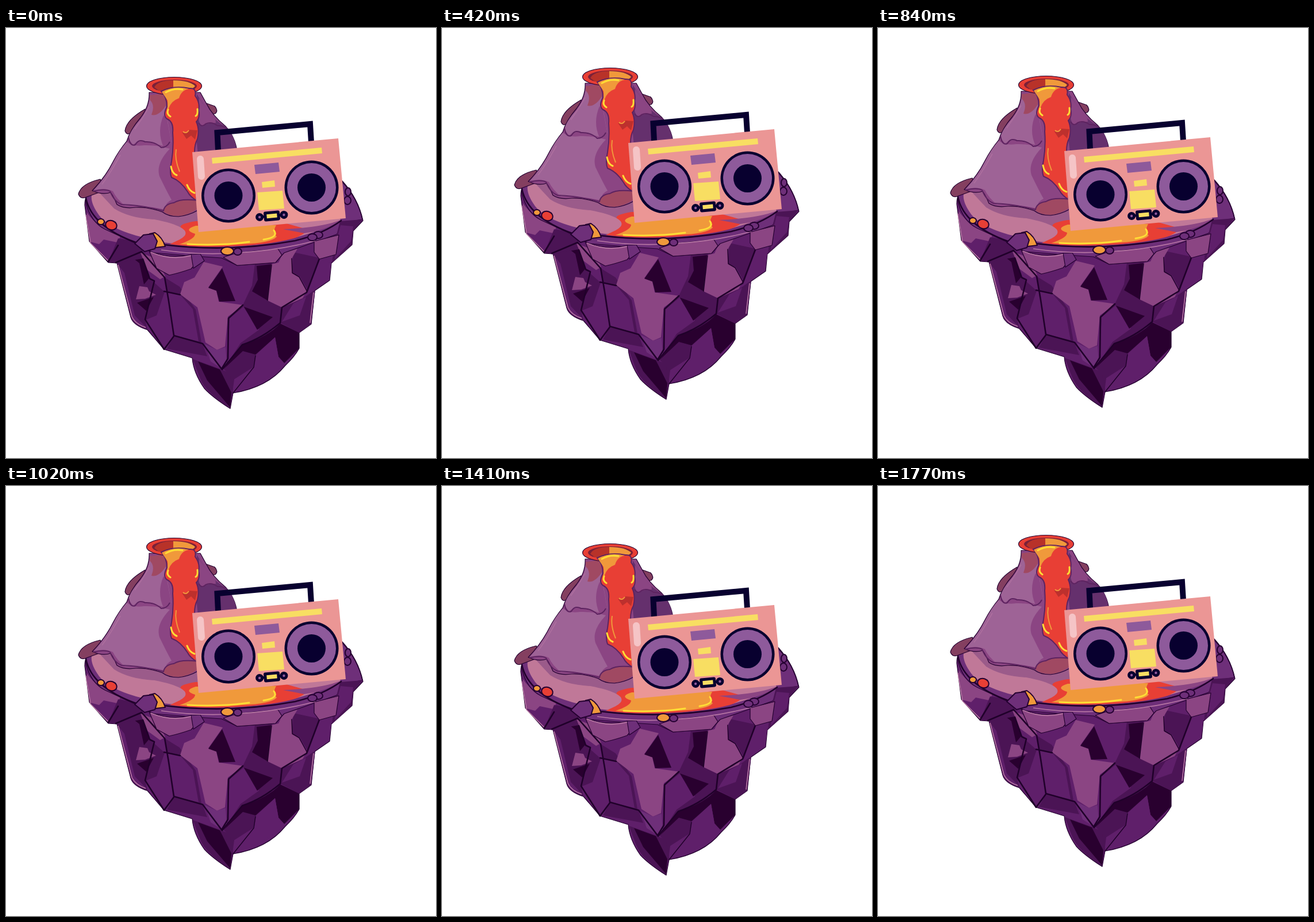
These frames come from a looping animation (748x748 px, 1800 ms). An HTML page:

```html
<!DOCTYPE html>
<html lang="en">
<head>
<meta charset="utf-8">
<title>Floating volcano</title>
<style>
html, body { margin: 0; width: 100%; height: 100%; overflow: hidden; background: #fff; }
svg { display: block; width: 100vw; height: 100vh; }
.deep { fill: #29002f; }
.dark { fill: #4b1455; }
.mid { fill: #5f1f6a; }
.plum { fill: #6e2f79; }
.mauve { fill: #8b4583; }
.cone { fill: #9e6396; }
.rose { fill: #c07898; }
.rust { fill: #a04962; }
.clay { fill: #843f60; }
.red { fill: #e83f35; }
.orange { fill: #f0993b; }
.yellow { fill: #f8de62; }
.navy { fill: #08002f; }
.violet { fill: #8e5a9b; }
.thin { stroke: #240030; stroke-width: 1.2; stroke-linejoin: round; }
.ink { stroke: #240030; stroke-width: 2; stroke-linejoin: round; }
.line { fill: none; stroke: #20002a; stroke-width: 2.6; stroke-linejoin: round; stroke-linecap: round; }
.seam { fill: none; stroke: #5d2360; stroke-width: 2; stroke-linejoin: round; }
.glow { fill: none; stroke: #fede35; stroke-width: 3; stroke-linecap: round; }
.edge { fill: none; stroke: #b877a4; stroke-width: 1.6; stroke-linejoin: round; }
</style>
</head>
<body>
<svg viewBox="0 0 748 748">
<g id="island">

  <g id="rock">
    <path class="mid thin" d="M150 283Q137 288 137 308L145 371L178 408L193 409L217 503Q221 517 246 525L275 559L324 574Q326 600 345 627Q360 643 390 662L395 635Q455 625 485 588Q503 571 510 557V530L531 515L537 457L563 439L566 409L602 377L604 353L621 335Q613 297 585 266L400 250Z"/>
    <path class="dark" d="M193 409L236 389L250 436L276 459L262 500L242 508L246 524Q222 518 217 503Z"/>
    <path class="mid" d="M206 426L224 500L245 522Q222 516 218 503L195 412Z"/>
    <path class="deep" d="M205 388L236 391L250 434L240 446L232 409Z"/>
    <path class="mauve" d="M140 320L147 372L162 376L170 368L194 373L200 360Q160 350 140 320Z"/>
    <path class="dark" d="M195 366L236 372L238 401L191 409L178 407Z"/>
    <path class="mauve" d="M234 391L263 402L277 432L268 437L246 421Z"/>
    <path class="mauve" d="M232 449L246 451L249 458L261 464L242 471L226 472Z"/>
    <path class="deep" d="M228 478L257 468L244 492Z"/>
    <path class="dark" d="M276 434L302 450L330 490L340 547L294 535L282 462Z"/>
    <path class="mid" d="M277 457L303 464L325 489L335 545L294 536Z"/>
    <path class="dark" d="M292 536L342 550L350 571L280 558Z"/>
    <path class="dark" d="M401 410L463 408L455 474L480 486L477 513Q445 540 411 550L384 582L388 505L412 483Z"/>
    <path class="mid" d="M400 411L433 410L428 448L412 482L398 478L377 418Z"/>
    <path class="deep" d="M436 414L461 411L455 474L428 458L438 438Z"/>
    <path class="mid" d="M389 505L413 485L440 525L408 548L385 584Z"/>
    <path class="deep" d="M414 485L464 503L437 525Z"/>
    <path class="mauve" d="M344 407L377 415L352 451L366 457L370 476L413 482L386 502L381 554L367 560L347 547L333 486L303 463L310 442L328 434Z"/>
    <path class="deep" d="M376 418L399 475L371 476L366 457L352 452Z"/>
    <path class="plum" d="M346 550L367 560L382 555L384 583L376 593L356 580Z"/>
    <path class="dark" d="M480 486L517 470L538 455L531 515L510 530L477 513Z"/>
    <path class="mid" d="M500 479L522 468L511 500L480 511Z"/>
    <path class="dark" d="M500 390L546 400L524 455L511 432L497 427Z"/>
    <path class="mid" d="M545 401L566 409L562 439L528 455Z"/>
    <path class="mauve" d="M462 411L474 408L482 391L507 384L497 401L498 426L509 433L523 457L516 470L480 486L455 474Z"/>
    <path class="dark" d="M325 576L375 594L393 602L395 635L390 661Q348 635 338 610Z"/>
    <path class="deep" d="M334 580L372 594L392 634L390 660L350 613Z"/>
    <path class="dark" d="M378 593L411 551L470 523L467 539L434 570L430 590L397 611L394 634L390 604Z"/>
    <path class="deep" d="M411 551Q455 538 477 514L510 530V557L484 583L474 572L468 538L434 568L412 562L379 593Z"/>
    <path class="mid" d="M468 538L474 572L484 583Q454 615 397 633L431 590L434 569Z"/>
    <path class="line" d="M191 408L236 389L276 434L283 475L292 535L342 549L375 593L386 575L387 505L412 482M238 402L250 436L258 440L242 507L275 559L292 536M275 458L303 464"/>
    <path class="line" d="M546 399L523 460L480 486L477 513Q445 540 411 551L376 594"/>
    <path class="line" style="stroke-width:1.5" d="M434 570L431 590L395 635M455 474L462 412M497 401L498 426L510 433L523 457"/>
    <path class="edge" d="M139 325L147 374L179 406M195 412L219 502Q225 515 243 521M535 460L529 513"/>
  </g>

  <g id="plateau">
    <path class="plum thin" d="M151 281Q137 288 139 304Q148 338 172 350L226 375L256 391L330 397L375 400L402 413L468 408L484 391L538 372L575 359L590 338L620 333Q612 297 585 268Z"/>
    <path class="dark" d="M581 336L620 333L604 353L602 377L567 409L571 376Z"/>
    <path class="mid" d="M582 343L604 345L600 371L572 402L577 362Z"/>
    <path class="rose" d="M151 284Q143 300 162 326Q178 347 226 361L274 373Q350 383 420 378Q520 369 582 334L560 290L340 270Z"/>
    <path fill="#9b5b8a" d="M160 284L188 314Q215 331 258 333Q290 339 304 347L334 340V285Z"/>
    <path class="mauve thin" d="M249 388Q285 403 322 394L336 403L322 419Q302 426 284 430L262 418Z"/>
    <path class="plum thin" d="M322 394L338 393L345 405L326 418Z"/>
    <path class="edge" d="M252 390Q286 405 322 396"/>
    <path class="mauve thin" d="M402 391L473 384L480 395L469 408L402 413L378 399Z"/>
    <path class="mauve thin" d="M536 371L579 360L574 394L545 402L536 390Z"/>
    <path class="line" d="M139 296Q149 345 226 373M275 377Q390 391 503 370Q552 358 583 335M178 406L195 378"/>
    <path class="edge" d="M270 386Q340 396 402 391Q475 387 538 370"/>
    <path class="orange ink" d="M250 358L259 356Q272 364 277 380L260 382Z"/>
    <path class="plum ink" d="M224 375L239 360L256 358L263 371L259 384L241 389Z"/>
    <path class="red" d="M330 336Q300 341 304 347Q322 357 302 368L285 376Q330 382 382 380Q455 378 500 366Q527 357 520 349L470 335Z"/>
    <path class="orange" d="M330 344Q307 351 329 358Q329 367 302 376Q360 381 410 376Q462 374 471 363Q463 355 470 343Z"/>
    <path class="glow" d="M316 376Q375 379 423 372M448 368Q475 364 466 352"/>
    <path class="mauve" d="M482 350Q550 347 582 334Q558 352 519 357Z"/>
    <g class="ink">
      <ellipse class="orange" cx="165" cy="337" rx="6" ry="5"/>
      <ellipse class="red" cx="183" cy="343" rx="10" ry="8" transform="rotate(20 183 343)"/>
      <ellipse class="plum" cx="403" cy="389" rx="7" ry="6"/>
      <ellipse class="orange" cx="385" cy="388" rx="11" ry="7"/>
      <ellipse class="plum" cx="543" cy="360" rx="8" ry="6"/>
      <ellipse class="plum" cx="533" cy="364" rx="8" ry="6"/>
      <ellipse class="plum" cx="595" cy="285" rx="5" ry="7"/>
      <ellipse class="plum" cx="594" cy="300" rx="6" ry="7"/>
    </g>
  </g>

  <g id="volcano">
    <path class="clay thin" d="M164 263Q130 271 126 289Q130 299 140 294L173 282Z"/>
    <path class="clay thin" d="M242 141Q209 160 207 179Q210 187 216 183L244 166Z"/>
    <path class="clay thin" d="M346 130L363 136Q370 144 364 149L352 151Z"/>
    <path class="mauve thin" d="M249 112Q250 135 234 156Q216 177 210 197Q196 214 186 233Q173 259 150 283Q168 291 182 286Q187 293 193 307Q205 315 226 312Q248 311 272 320Q282 328 300 328Q318 326 334 317V230L402 215Q399 190 382 171Q358 151 349 132L338 112Z"/>
    <path class="cone" d="M210 198Q222 207 240 204Q260 203 285 210Q260 236 267 258Q280 285 288 299Q276 304 278 316Q240 308 207 309Q192 297 186 284Q173 277 153 282Q175 258 187 233Q196 214 210 198Z"/>
    <path class="rust" d="M272 318Q276 307 292 304Q304 296 334 300V314Q317 326 300 327Q282 327 272 318Z"/>
    <path class="seam" d="M152 284Q172 279 181 284Q188 302 201 307Q236 308 274 318Q276 306 292 304Q304 296 334 300"/>
    <path class="cone" d="M250 119Q250 139 234 159Q215 179 213 193L221 203Q231 194 247 198L273 205L288 199L280 155L276 120Z"/>
    <path class="mauve" d="M274 152L280 158L288 200L274 207Q262 180 274 152Z"/>
    <path class="rust" d="M250 117L277 114L278 135Q266 154 253 151Q260 134 250 125Z"/>
    <path class="seam" d="M213 190Q216 207 225 203Q231 192 242 198Q258 197 270 208Q280 208 285 198"/>
    <path class="edge" d="M249 137Q237 158 224 176M199 221Q180 255 167 272" opacity=".6"/>
    <path fill="#65306d" d="M332 115Q343 132 352 147Q362 160 384 173Q399 190 401 211L334 222L329 166Z"/>
    <path class="mauve" d="M336 122L355 150Q366 158 365 165Q349 165 342 171Q333 166 335 145Z"/>
    <path class="seam" d="M335 165Q341 174 347 167Q357 162 368 170Q381 169 388 179"/>
    <ellipse class="red thin" cx="292.5" cy="101" rx="48" ry="15.5"/>
    <ellipse cx="293" cy="101" rx="39" ry="11" fill="#7b2038"/>
    <path fill="#b83229" d="M258 103Q264 91 291 91V109L266 109Z"/>
    <path class="orange" d="M291 91Q319 91 329 101Q323 110 291 110Z"/>
    <path class="seam" style="fill:#e83f35" d="M270 110Q292 99 319 105Q332 104 329 118Q338 130 335 143Q338 156 331 163Q337 176 333 193Q324 210 331 239V300Q320 293 316 285Q304 266 288 260Q284 251 288 232Q292 208 290 182Q292 163 280 158Q272 152 280 137Q280 120 270 110Z"/>
    <path class="orange" d="M271 111Q294 99 318 106Q305 108 301 122Q287 127 283 140L279 150Q282 135 281 126Z"/>
    <path class="glow" d="M278 112Q291 104 307 107M282 142Q279 150 286 154M333 141Q334 151 330 153M287 241Q289 253 297 256M315 273Q319 284 328 287"/>
    <path fill="#bd302d" d="M306 181Q313 185 319 177L333 178L329 194L322 187L314 193Z"/>
    <path fill="none" stroke="#f0993b" stroke-width="2" d="M308 180Q313 185 318 178M296 211Q293 228 302 250"/>
  </g>

  <g id="radio">
    <path fill="none" stroke="#08002f" stroke-width="10" d="M369 213L367.5 182L529 167L531 199"/>
    <path fill="#eb9695" d="M324 216L578 192L591 331L335 355Z"/>
    <path fill="none" stroke="#f5c4c6" stroke-width="12" stroke-linecap="round" d="M338 228L340 258"/>
    <path class="yellow" d="M358 226L549 208L550 218L359 236ZM445 268L467 265L468 276L446 278ZM437 286L481 283L484 314L440 317Z"/>
    <path class="violet" d="M432 238L474 234L476 250L434 254Z"/>
    <g id="speaker">
      <circle class="navy" cx="387" cy="291.5" r="47"/>
      <circle class="violet" cx="387" cy="291.5" r="42.5"/>
      <circle class="navy" cx="387" cy="291.5" r="24.5"/>
    </g>
    <use href="#speaker" x="144.5" y="-14"/>
    <g transform="rotate(-5.4 462 327)">
      <path stroke="#08002f" stroke-width="4" d="M441 327H484"/>
      <rect class="navy" x="448.5" y="318.5" width="28" height="17" rx="3"/>
      <rect class="yellow" x="453.5" y="323.5" width="18" height="7"/>
      <circle class="navy" cx="441" cy="327" r="7"/>
      <circle class="navy" cx="483.5" cy="327" r="7"/>
      <circle class="violet" cx="441" cy="327" r="2.2"/>
      <circle class="violet" cx="483.5" cy="327" r="2.2"/>
    </g>
  </g>

</g>
</svg>
<script>
const LOOP = 1800, STEP = 30;
// [ms, vertical shift], linear in between
const path = [[0, 0], [450, -17], [1350, 17], [1770, 0], [LOOP, 0]];
const island = document.getElementById('island');
const start = performance.now();

function shiftAt(t) {
  const i = path.findIndex(p => p[0] > t);
  const [t0, y0] = path[i - 1], [t1, y1] = path[i];
  return Math.round(y0 + (y1 - y0) * (t - t0) / (t1 - t0));
}

function draw() {
  const t = Math.max(0, performance.now() - start) % LOOP;
  island.setAttribute('transform', `translate(0 ${shiftAt(Math.floor(t / STEP) * STEP)})`);
  requestAnimationFrame(draw);
}
draw();
</script>
</body>
</html>
```
